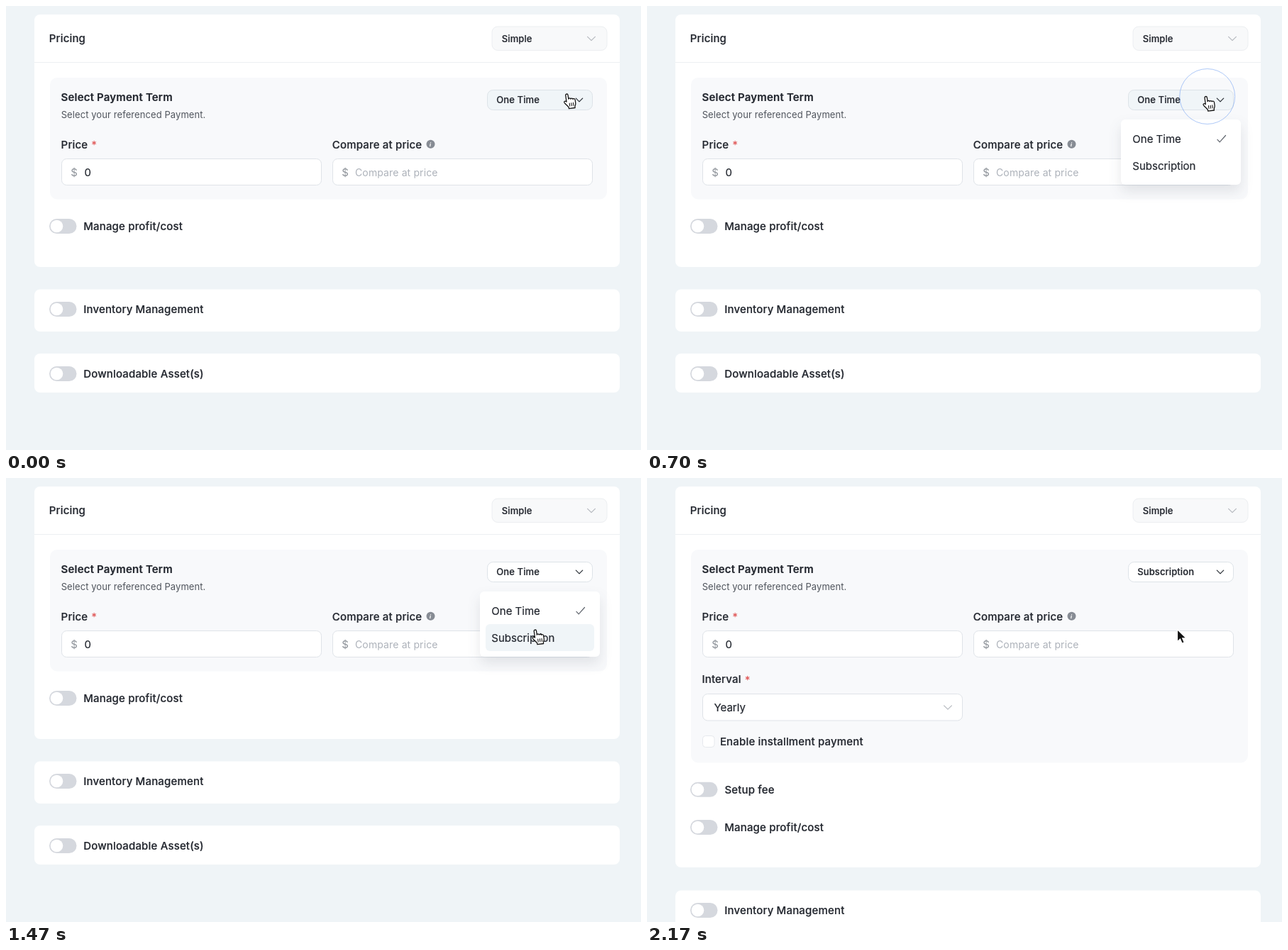
Recreate the animation shown at these times as an HTML page. Size 895 by 626 pixels, loop 2240 ms.

```html
<!DOCTYPE html>
<html lang="en">
<head>
<meta charset="utf-8">
<title>Pricing form</title>
<style>
  html, body { margin: 0; width: 100%; height: 100%; overflow: hidden; background: #eff4f7; }
  svg { display: block; width: 895px; height: 626px; }
  text { font: 500 15px Inter, "Liberation Sans", sans-serif; letter-spacing: .17px; fill: #23272f; stroke: #23272f; stroke-width: .2px; white-space: pre; }
  .strong { font-weight: 600; letter-spacing: .18px; }
  .note { font-size: 13px; font-weight: 400; letter-spacing: .08px; fill: #50555d; stroke: none; }
  .small { font-size: 13px; letter-spacing: .1px; }
  .value { font-weight: 400; letter-spacing: 0; }
  .hint { font-size: 14px; font-weight: 400; letter-spacing: .13px; fill: #adb2ba; stroke: none; }
  .sign { font-weight: 400; fill: #8d9299; stroke: none; }
  .star { fill: #e05252; stroke: none; }
  .info { font: italic 700 9px "Liberation Serif", serif; fill: #fff; stroke: none; text-anchor: middle; }
  .card { fill: #fff; }
  .panel { fill: #f8f9fb; }
  .field { fill: #fff; stroke: #dfe3e8; }
  .line { fill: none; stroke-linecap: round; stroke-linejoin: round; }
  .hover { fill: #f0f5f8; }
  #popup { filter: drop-shadow(0 9px 9px rgba(40, 50, 65, .11)); }
</style>
</head>
<body>
<svg viewBox="0 0 895 626">
  <defs>
    <g id="toggle">
      <rect x="61" y="-10.5" width="38.5" height="21" rx="10.5" fill="#d5d8de"/>
      <circle cx="71.5" r="8.8" fill="#fff"/>
    </g>
    <path id="chevron" class="line" d="M-5.4-2.7 0 2.7 5.4-2.7"/>
  </defs>

  <rect id="mainCard" class="card" x="40" y="12" width="825" rx="8"/>
  <path d="M40 79.5H865" stroke="#eceff2"/>
  <text x="60.8" y="50.5">Pricing</text>
  <rect x="685" y="29" width="162" height="33.5" rx="8" fill="#f8f9fa" stroke="#eceef1"/>
  <text class="small" x="698.8" y="50.7">Simple</text>
  <use href="#chevron" x="825" y="46" stroke="#b4b8be" stroke-width="1.15"/>

  <rect id="panel" class="panel" x="62" y="101" width="785" rx="10"/>
  <text class="strong" x="77.6" y="134">Select Payment Term</text>
  <text class="note" x="77.7" y="157.5">Select your referenced Payment.</text>
  <rect id="button" x="678.5" y="118.5" width="148" height="28" rx="8" stroke="#dde3e8"/>
  <text id="term" class="small" x="691.3" y="137"></text>
  <use href="#chevron" transform="translate(808 132.5) scale(.87)" stroke="#30353c" stroke-width="1.5"/>

  <text x="77.6" y="200.5">Price</text>
  <text class="star" x="120.3" y="200.8">*</text>
  <rect class="field" x="78.5" y="215.5" width="366" height="37" rx="7"/>
  <text class="sign" x="91.3" y="239.8">$</text>
  <text class="value" x="110.4" y="239.8">0</text>
  <text x="459.8" y="200.5">Compare at price</text>
  <circle cx="598.5" cy="194.8" r="6" fill="#878c94"/>
  <text class="info" x="598" y="198">i</text>
  <rect class="field" x="460.5" y="215.5" width="366" height="37" rx="7"/>
  <text class="sign" x="473.3" y="239.8">$</text>
  <text class="hint" x="492" y="239.6">Compare at price</text>

  <g id="extra">
    <text x="77.5" y="289">Interval</text>
    <text class="star" x="137.7" y="289.5">*</text>
    <rect class="field" x="78.5" y="304.5" width="366" height="37.5" rx="7"/>
    <text class="value" x="94.5" y="328.5">Yearly</text>
    <use href="#chevron" x="424" y="323.5" stroke="#b4b8be" stroke-width="1.15"/>
    <rect x="78.5" y="363.5" width="16.5" height="16" rx="4" fill="#fff" stroke="#e6e9ed"/>
    <text x="102.9" y="377">Enable installment payment</text>
    <use href="#toggle" y="439.3"/>
    <text x="109.4" y="444.8">Setup fee</text>
  </g>

  <g id="lower">
    <use href="#toggle" y="310.5"/>
    <text x="109.2" y="316">Manage profit/cost</text>
    <rect class="card" x="40" y="399.5" width="825" height="59.5" rx="8"/>
    <use href="#toggle" y="427.5"/>
    <text x="109.2" y="433">Inventory Management</text>
    <rect class="card" x="40" y="490" width="825" height="55" rx="8"/>
    <use href="#toggle" y="518.5"/>
    <text x="109.2" y="524">Downloadable Asset(s)</text>
  </g>

  <g id="popup">
    <rect class="card" x="668" y="160" width="169" height="92" rx="6"/>
    <rect id="hover" class="hover" x="676" width="153" height="38" rx="6"/>
    <text class="value" x="684.3" y="192.8">One Time</text>
    <text class="value" x="684.3" y="231">Subscription</text>
    <path id="check" class="line" d="M804 188.3 807.2 191.8 815.5 182.5" stroke="#60656d" stroke-width="1.2"/>
  </g>

  <circle id="ring" fill="none" stroke="#6b9cf0"/>

  <g id="hand" stroke="#111" stroke-width="1.2" stroke-linejoin="round" stroke-linecap="round">
    <path fill="#fff" d="M-4.8-7.8C-4.8-10.2-1.7-10.2-1.7-7.8V-2.6C-1.4-4 1-3.9 1.1-2.2 1.5-3.4 3.7-3.2 3.9-1.6 4.4-2.7 6.8-2.4 6.8-.4V4C6.8 6 5.7 7 5.3 8.4V10H-2.9V8.3C-3.9 6.3-6 4.3-7.6 1.7-8.6-.1-6.7-1.6-4.8.6Z"/>
    <path fill="none" stroke-width="1" d="M-1.2 3V6.8M1.3 3V6.8M3.8 3V6.8"/>
  </g>
  <path id="arrow" fill="#111" stroke="#fff" stroke-width="1.1" d="M0 0V16L3.7 12.6 6.2 18.2 9 17 6.6 11.5H11.5Z"/>
</svg>

<script>
const LOOP = 2240, STEP = 70;
const PICK = 1890, ARROW = 2170;
const clicks = [
  { from: 280, to: 840, base: 420, x: 789.7, y: 127.5, alpha: .55 },
  { from: 1750, to: 2170, base: 1815, x: 747, y: 214, alpha: .8 }
];

const el = id => document.getElementById(id);
const set = (id, attrs) => {
  for (const key in attrs) el(id).setAttribute(key, attrs[key]);
};
const show = (id, on) => set(id, { display: on ? 'inline' : 'none' });
const clamp = u => Math.max(0, Math.min(1, u));
const mix = (a, b, u) => a + (b - a) * u;
const smooth = u => u * u * (3 - 2 * u);
const easeOut = u => 1 - (1 - u) ** 3;

// Centre of the hand: a small nudge, then a glide down to the second option
function handAt(t) {
  const nudge = clamp(t / 140);
  const glide = smooth(clamp((t - 770) / 530));
  return {
    x: mix(mix(795, 792.3, nudge), 750.5, glide),
    y: mix(mix(133.7, 137.2, nudge), 223.7, glide)
  };
}

function popupScale(t) {
  if (t < 490) return 0;
  if (t < PICK) return easeOut(clamp((t - 450) / 200));
  return 1 - easeOut(clamp((t - 1872) / 210));
}

function drawRing(t) {
  const click = clicks.find(c => t >= c.from && t < c.to);
  show('ring', click);
  if (!click) return;
  const age = t - click.base;
  set('ring', {
    cx: click.x, cy: click.y,
    r: 22.3 + age * .0595,
    'stroke-width': mix(4, 1, clamp(age / 280) ** 2),
    opacity: click.alpha
  });
}

function drawPopup(t, tipY, picked) {
  const scale = popupScale(t);
  show('popup', scale > .01);
  set('popup', {
    transform: `translate(0 160) scale(1 ${scale}) translate(0 -160)`,
    opacity: scale
  });
  show('hover', tipY > 168);
  set('hover', { y: tipY > 206 ? 206 : 168 });
  set('check', { transform: `translate(0 ${picked ? 38 : 0})` });
}

function draw(t) {
  const picked = t >= PICK;
  const hand = handAt(t);
  const tipY = hand.y - 9.5;

  set('mainCard', { height: picked ? 537 : 356 });
  set('panel', { height: picked ? 300.5 : 171.5 });
  set('lower', { transform: `translate(0 ${picked ? 182 : 0})` });
  show('extra', picked);
  el('term').textContent = picked ? 'Subscription' : 'One Time';
  set('button', { fill: tipY < 147 ? '#f0f5f8' : '#fff' });

  drawPopup(t, tipY, picked);
  drawRing(t);

  show('hand', t < ARROW);
  show('arrow', t >= ARROW);
  set('hand', { transform: `translate(${hand.x} ${hand.y}) rotate(-8) scale(1.07)` });
  set('arrow', { transform: 'translate(747.5 213.5) scale(1.08)' });
}

const start = performance.now();
function tick() {
  const t = (performance.now() - start) % LOOP;
  draw(Math.floor(t / STEP) * STEP);
  requestAnimationFrame(tick);
}
tick();
</script>
</body>
</html>
```
